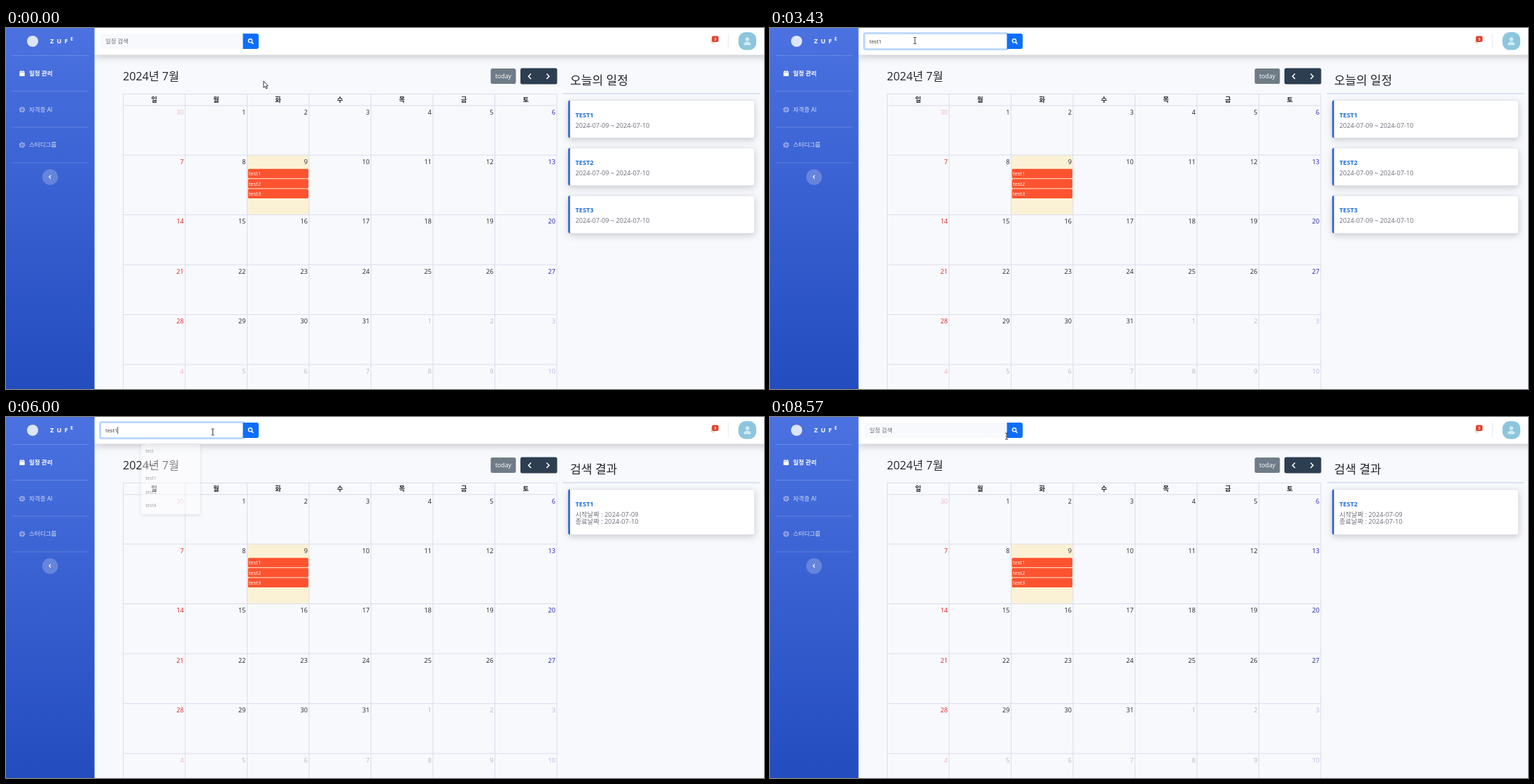
An HTML page that plays this animation: 1083x517 px, repeating every 9.33 s.

```html
<!DOCTYPE html>
<html lang="ko">
<head>
<meta charset="utf-8">
<title>일정 관리</title>
<style>
  html, body { margin: 0; width: 100%; height: 100%; overflow: hidden; background: #f8f9fc; }
  svg { display: block; width: 100vw; height: 100vh; }
  text { font-family: "Open Sans", "Noto Sans CJK KR", "Noto Sans CJK", "Noto Sans CJK JP", sans-serif; white-space: pre; }
  .bar { filter: drop-shadow(0 2px 6px rgba(58, 59, 69, .3)); }
  .card { filter: drop-shadow(0 3px 5px rgba(58, 59, 69, .25)); }
  .pop { filter: drop-shadow(0 1px 2px rgba(0, 0, 0, .3)); }
</style>
</head>
<body>
<svg id="stage" viewBox="0 0 1083 517" xmlns="http://www.w3.org/2000/svg">
  <defs>
    <linearGradient id="blue" x1="0" y1="0" x2="0" y2="1">
      <stop offset="0" stop-color="#4b72e0"/>
      <stop offset="1" stop-color="#234cbf"/>
    </linearGradient>
  </defs>
  <rect width="1083" height="517" fill="#f8f9fc"/>
  <g id="calendar"></g>
  <g id="panel"></g>
  <g id="topbar"></g>
  <g id="search"></g>
  <g id="sidebar"></g>
  <g id="popup"></g>
  <g id="cursor"></g>
</svg>
<script>
const LOOP = 9330;
const el = id => document.getElementById(id);
const clamp = v => Math.max(0, Math.min(1, v));

// y is the middle of the line of text
const text = (x, y, size, fill, str, extra = '') =>
  `<text x="${x}" y="${(y + size * .36).toFixed(2)}" font-size="${size}" fill="${fill}" ${extra}>${str}</text>`;
const rect = (x, y, w, h, fill, r = 0, extra = '') =>
  `<rect x="${x}" y="${y}" width="${w}" height="${h}" rx="${r}" fill="${fill}" ${extra}/>`;
const line = (x1, y1, x2, y2, stroke, w = 1) =>
  `<line x1="${x1}" y1="${y1}" x2="${x2}" y2="${y2}" stroke="${stroke}" stroke-width="${w}"/>`;
const chevron = (x, y, dir, s, w) =>
  `<path d="M${x - dir * s / 2} ${y - s}L${x + dir * s / 2} ${y}L${x - dir * s / 2} ${y + s}" fill="none" stroke="#fff" stroke-width="${w}"/>`;
const BOLD = 'font-weight="700"', END = 'text-anchor="end"', MID = 'text-anchor="middle"';

// Each list holds [start time, value]
const TYPED = [[0, ''], [770, 't'], [1100, 'te'], [1170, 'tes'], [1230, 'test'], [1500, 'test1'], [3960, ''],
  [5330, 't'], [5430, 'test'], [5800, 'test1'], [6300, 'test'], [7100, 'test2'], [7640, '']];
const RESULT = [[0, ''], [3980, 'TEST1'], [7670, 'TEST2']];
const RELOAD = [[0, false], [4000, true], [4230, false], [7670, true], [7900, false]];
const CARET = [[0, false], [430, true], [2030, false], [2770, true], [3100, false], [4850, true], [7640, false]];
const FOCUS = [[440, 3880], [4880, 7640]];
const POPUPS = [
  { from: 430, to: 770, items: 'test test2 test3 test1 12 213' },
  { from: 770, to: 1610, items: 'test test2 test3 test1 test4', fade: true },
  { from: 4850, to: 5330, items: 'test test2 test1 test3 12 213' },
  { from: 5330, to: 5910, items: 'test test2 test1 test3 test4', fade: true },
  { from: 6400, to: 7210, items: 'test test2 test1 test3 test4', fade: true }
];
const FADE = 160;
const PATH = [[0, 368, 76], [30, 366, 74], [400, 212, 17], [570, 211.5, 17], [2240, 211.5, 17], [2270, 207, 18],
  [3430, 207, 18], [3850, 346, 21], [4050, 347, 24], [4400, 347, 24], [4830, 268, 25], [4900, 267.5, 25.5],
  [5250, 295.5, 21.5], [8440, 295.5, 21.5], [8570, 338, 27.5]];

function at(list, t) {
  let value = list[0][1];
  for (const [start, v] of list) if (t >= start) value = v;
  return value;
}

function pointer(t) {
  const i = PATH.findIndex(p => p[0] > t);
  if (i < 0) return PATH[PATH.length - 1].slice(1);
  const [a, b] = [PATH[i - 1], PATH[i]];
  const p = (t - a[0]) / (b[0] - a[0]);
  const e = p * p * (3 - 2 * p);
  return [a[1] + (b[1] - a[1]) * e, a[2] + (b[2] - a[2]) * e];
}

function sidebar() {
  const gear = y => `<g stroke="#fff" fill="none" opacity=".5"><circle cx="23" cy="${y}" r="2.9" stroke-width="1.3"/>` +
    `<circle cx="23" cy="${y}" r="3.8" stroke-width="1.1" stroke-dasharray="1.7 2.28"/><circle cx="23" cy="${y}" r="1" stroke-width=".7"/></g>`;
  return rect(0, 0, 126.5, 517, 'url(#blue)') +
    '<circle cx="38" cy="19" r="8" fill="#dce5fb"/>' +
    text(63, 18.5, 9, '#fff', 'ZUF', BOLD + ' letter-spacing="4.2"') + text(92, 16, 6.8, '#fff', 'E', BOLD) +
    [39.5, 90.5, 142, 193].map(y => line(8, y, 118, y, 'rgba(255,255,255,.17)')).join('') +
    rect(19.3, 62, 7.4, 7, '#fff', .8) + rect(20.8, 60.7, 1.1, 2, '#fff') + rect(24.1, 60.7, 1.1, 2, '#fff') +
    line(19.3, 63.8, 26.7, 63.8, '#3c65d6', .5) +
    text(33, 64.5, 8.5, '#fff', '일정 관리', BOLD) +
    gear(117) + text(33, 116.5, 8.5, '#d8e0f7', '자격증 AI') +
    gear(167.5) + text(33, 167, 8.5, '#d8e0f7', '스터디그룹') +
    '<circle cx="63" cy="213.5" r="11.2" fill="#fff" fill-opacity=".22"/>' + chevron(62.8, 213.3, -1, 2.3, 1.2);
}

function topbar(badge) {
  return rect(126, -12, 970, 50.5, '#fff', 0, 'class="bar"') +
    '<path d="M1006 21.5q1.4-1 1.4-3.5a2.6 2.6 0 0 1 5.200q0 2.500 1.400 3.500z" fill="#e3dfc0"/>'.replace('5.200q0 2.500', '5.2 0q0 2.5') +
    '<circle cx="1010" cy="22.300" r="1.1" fill="#e3dfc0"/>' +
    rect(1008.5, 11.5, 9.5, 8.5, '#e0402f', 2) + text(1013.3, 15.7, 5.5, '#fff', badge, BOLD + ' ' + MID) +
    line(1032, 8, 1032, 29, '#e3e6f0') +
    rect(1046.500, 6, 25.5, 25.5, '#8cc6dd', 10) +
    '<circle cx="1059.2" cy="16" r="2.7" fill="#d3ebf4"/><path d="M1054 24.500q0-4.700 5.200-4.700t5.200 4.700z" fill="#d3ebf4"/>';
}

function search(typed, glow, caret) {
  const probe = [0, .353, .914, 1.391, 1.744, 2.316][typed.length] * 7.5;
  let s = rect(135, 8, 204, 22, '#f8f9fc', 2);
  if (glow > 0) {
    s += `<g opacity="${glow}">` + rect(134, 7, 206.5, 24, '#fff', 3, 'stroke="#c2dbfe" stroke-width="2.200"') +
      rect(135.2, 8.2, 204, 21.600, '#fff', 2, 'stroke="#86b7fe" stroke-width=".7"') + '</g>';
  }
  s += '<path d="M338.500 8h19.500a3 3 0 0 1 3 3v16a3 3 0 0 1-3 3h-19.500z" fill="#0d6efd"/>' +
    '<circle cx="349" cy="18.300" r="2.600" fill="none" stroke="#fff" stroke-width="1.4"/>' +
    line(350.8, 20.100, 353.500, 22.800, '#fff', 1.600);
  s += typed ? text(142, 19, 7.5, '#333', typed) : text(142, 18.700, 8.4, '#6e707e', '일정 검색');
  if (caret) s += line(142.3 + probe, 14, 142.3 + probe, 24, '#222', .8);
  return s;
}

function calendar(empty) {
  const left = 167.5, step = 88.5, right = left + 7 * step;
  const rows = empty ? [111, 184.2, 258.5, 332, 405.5, 479] : [111, 182, 267.5, 339, 410.5, 482];
  const edge = '#dcdbee';
  const col = i => left + i * step;
  const ink = i => i === 0 ? '#d9252b' : i === 6 ? '#2320a8' : '#212529';
  let s = text(167, 69.5, 16.2, '#212529', '2024년 7월') +
    rect(692.5, 58, 36, 22, '#6f7c88', 2.5) + text(710.5, 69, 8.8, '#fff', 'today', MID) +
    rect(735, 57.5, 52.5, 23, '#2c3e50', 2.5) + chevron(748.3, 69.200, -1, 3.700, 1.500) + chevron(774.200, 69.200, 1, 3.700, 1.500) +
    rect(col(2), rows[1], step, rows[2] - rows[1], '#fbf2d6');
  s += [94.5, ...rows].map(y => line(left, y, right, y, edge)).join('');
  for (let i = 0; i < 8; i++) s += line(col(i), 94.5, col(i), 517, edge);
  [...'일월화수목금토'].forEach((day, i) => {
    s += text(col(i) + step / 2, 102.800, 9.2, '#212529', day, BOLD + ' ' + MID);
  });
  for (let n = 0; n < 42; n++) {
    const c = n % 7, y = rows[Math.floor(n / 7)] + 9.4;
    const inMonth = n > 0 && n < 32;
    const day = n === 0 ? 30 : inMonth ? n : n - 31;
    s += text(col(c) + step - 2, y, 9.2, ink(c), day, `${END} opacity="${inMonth ? 1 : .3}"`);
  }
  if (!empty) {
    for (let i = 0; i < 3; i++) {
      const y = 201.8 + i * 14.4;
      s += rect(345.700, y, 86.300, 13.4, '#fd5330', 1.5) + text(347, y + 7, 7.4, '#fff', 'test' + (i + 1));
    }
  }
  return s;
}

function card(y, h, title, lines) {
  return rect(803.5, y, 266, h, '#fff', 3, 'class="card"') +
    rect(803.5, y, 266, h, 'none', 3, 'stroke="#dcdfe9" stroke-width=".8"') +
    `<path d="M806 ${y}q-3 0-3 3v${h - 6}q0 3 3 3z" fill="#4370dc"/>` +
    text(813.5, y + 21, 9.2, '#1f6fdb', title, BOLD) +
    lines.map((str, i) => text(813.5, y + 35.700 + i * 10.700, lines.length > 1 ? 9.3 : 9.200, '#6c6e78', str)).join('');
}

function panel(result) {
  const head = text(806, 75, 17.1, '#212529', result ? '검색 결과' : '오늘의 일정') + line(796, 94, 1077, 94, '#bccbe6');
  if (result) return head + card(103.5, 65, result, ['시작날짜 : 2024-07-09', '종료날짜 : 2024-07-10']);
  return head + [1, 2, 3].map(n => card(35.2 + n * 68.3, 54, 'TEST' + n, ['2024-07-09 ~ 2024-07-10'])).join('');
}

function popup(t) {
  const p = POPUPS.find(q => t >= q.from && t < q.to + (q.fade ? FADE : 0));
  if (!p) return '';
  const items = p.items.split(' ');
  const h = items.length * 20.300 + 2, mid = 37.5 + h / 2;
  const out = clamp((t - p.to) / FADE), k = 1 - .055 * out;
  return `<g class="pop" opacity="${1 - out}" transform="translate(235.3 ${mid}) scale(${k}) translate(-235.3 ${-mid})">` +
    rect(191.5, 37.5, 87.500, h, '#fff', 3) + '<path d="M197.500 38l5-5.500l5 5.500z" fill="#fff"/>' +
    items.map((str, i) => text(198, 47.2 + i * 20.25, 7, '#333', str)).join('') + '</g>';
}

function cursor([x, y]) {
  const move = `<g transform="translate(${x.toFixed(2)} ${y.toFixed(2)})">`;
  if (y > 32 || x > 362) {
    return move + '<path d="M0 0v9.500l2.200-2l1.600 3.400l1.500-.7l-1.500-3.200h2.700z" fill="#fff" stroke="#222" stroke-width=".9"/></g>';
  }
  if (x > 340) {
    return move + '<path d="M-2-6.500q1.200-1.400 2.200 0v4.500l4 1q1.200.5 1 2l-.9 4.800h-5.300l-3.300-4.300q0-1.400 1.200-1l1.100.8z" fill="#fff" stroke="#222" stroke-width=".9" stroke-linejoin="round"/></g>';
  }
  return move + '<path d="M-2-4.500h1.500l.5.500l.5-.5h1.500M0-4v8M-2 4.500h1.500l.5-.5l.5.5h1.500" fill="none" stroke="#222" stroke-width=".9"/></g>';
}

const drawn = {};
function show(id, markup) {
  if (drawn[id] === markup) return;
  drawn[id] = markup;
  el(id).innerHTML = markup;
}

function render(t) {
  const empty = at(RELOAD, t);
  const glow = Math.max(...FOCUS.map(([a, b]) => Math.min(clamp((t - a) / 150), clamp(1 - (t - b) / 150))));
  show('calendar', calendar(empty));
  show('panel', panel(at(RESULT, t)));
  show('topbar', topbar(empty ? 6 : 3));
  show('search', search(at(TYPED, t), glow, at(CARET, t)));
  show('popup', popup(t));
  show('cursor', cursor(pointer(t)));
}

show('sidebar', sidebar());
const began = performance.now();
function tick() {
  render((performance.now() - began) % LOOP);
  requestAnimationFrame(tick);
}
tick();
</script>
</body>
</html>
```
